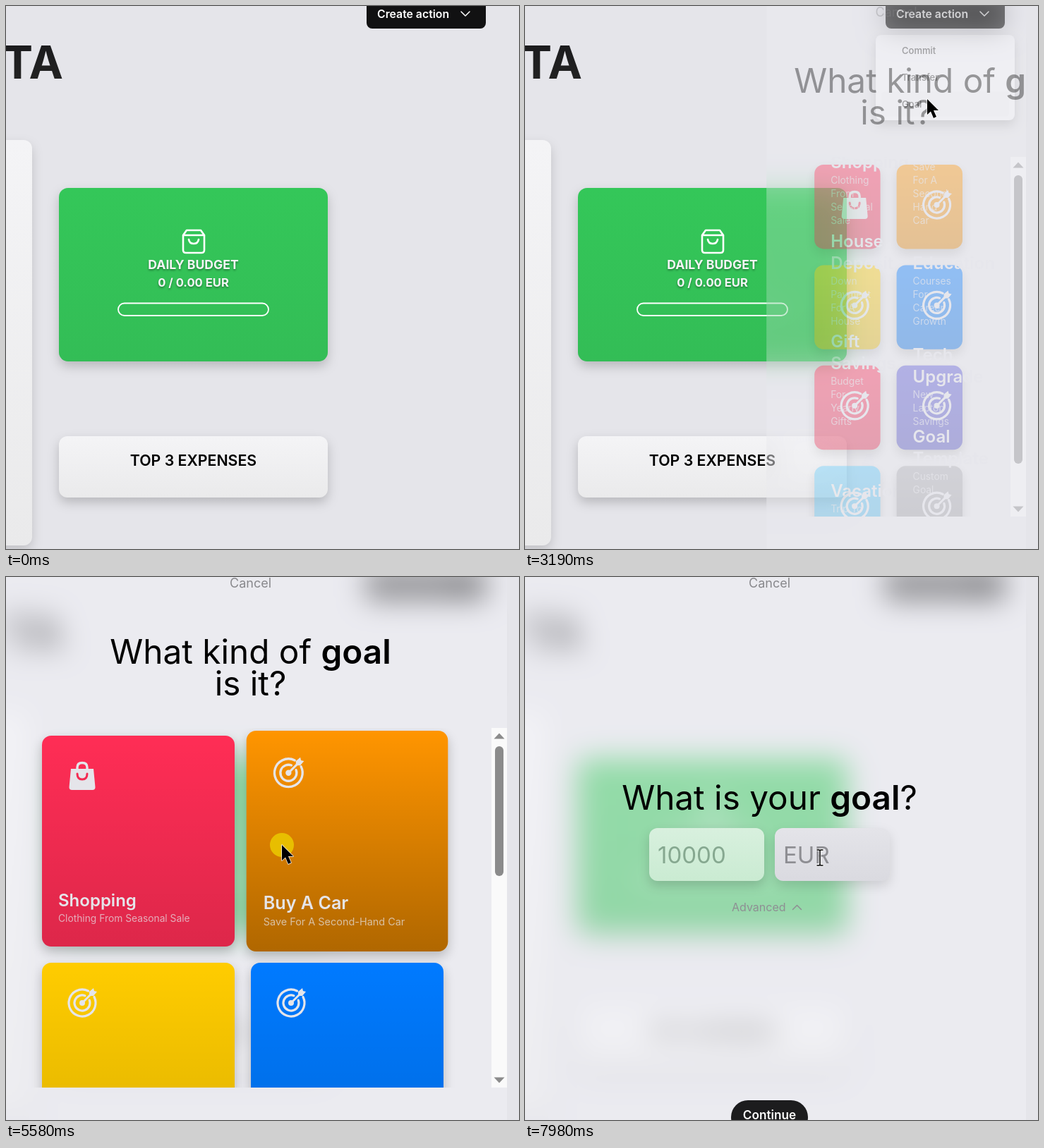
An HTML page with a canvas for the animation above (8 s loop, 727 px wide and 770 px high).

```html
<!DOCTYPE html>
<html lang="en">
<head>
<meta charset="utf-8">
<title>Budget goal</title>
<style>
html, body { margin: 0; width: 100%; height: 100%; overflow: hidden; background: #e5e5ea; }
canvas { display: block; }
</style>
</head>
<body>
<canvas id="stage" width="727" height="770"></canvas>
<script>
const W = 727, H = 770, PAD = 70, RIGHT = 710;
const LOOP = 8000, TICK = 133;
const BG = '#e5e5ea', GRAY = '#8e8e93';
const screen = document.getElementById('stage').getContext('2d');
let c = screen;

const CARDS = [
  ['#ff2d55', 'Shopping', 'Clothing From Seasonal Sale'],
  ['#ff9500', 'Buy A Car', 'Save For A Second-Hand Car'],
  ['#ffcc00', 'House Deposit', 'Down Payment For A House'],
  ['#007aff', 'Education', 'Courses For Career Growth'],
  ['#ff2d55', 'Gift Savings', 'Budget For Yearly Gifts'],
  ['#5856d6', 'Tech Upgrade', 'New Laptop Savings'],
  ['#5ac8fa', 'Vacation', 'Trip To Seaside'],
  ['#aeaeb2', 'Goal Template', 'Custom Goal', 46]
];

// pointer keys: tick, x, y, shape
const ARROW = 0, HAND = 1, BEAM = 2;
const PATH = [
  [2, 653, 285, ARROW], [3, 643, 210, ARROW], [4, 622, 105, ARROW], [5, 602, 35, ARROW],
  [7, 604, 20, HAND], [8, 604, 14, HAND], [14, 604, 14, HAND], [15, 602, 25, HAND],
  [16, 592, 62, HAND], [17, 578, 110, HAND], [18, 570, 132, HAND], [23, 570, 132, ARROW],
  [27, 570, 132, ARROW], [28, 450, 220, ARROW], [29, 345, 300, ARROW], [31, 315, 355, ARROW],
  [34, 315, 355, ARROW], [37, 365, 376, ARROW], [39, 390, 381, ARROW], [40, 391, 380, ARROW],
  [46, 391, 380, ARROW], [48, 381, 370, ARROW], [49, 333, 390, ARROW], [50, 300, 398, BEAM],
  [51, 273, 406, BEAM], [53, 312, 402, BEAM], [54, 335, 396, ARROW], [55, 344, 397, ARROW],
  [56, 388, 409, BEAM], [60, 418, 398, BEAM]
];
const POINTERS = [
  'M0 0V22L5 17.5 9 27 13 25 9 16H16Z',
  'M-2 16V2q2-4 4 0V10l7 2q3 1 3 4l-2 9v4H-1v-3L-8 17q-1-4 2-4z',
  'M-4-11h3l1 1 1-1h3M0-10V10M-4 11h3l1-1 1 1h3'
].map(d => new Path2D(d));

const ramp = (k, a, b) => Math.min(1, Math.max(0, (k - a) / (b - a)));
const easeInOut = p => p < .5 ? 4 * p ** 3 : 1 - 4 * (1 - p) ** 3;

function fade(y, h, top, bottom) {
  const g = c.createLinearGradient(0, y, 0, y + h);
  g.addColorStop(0, top);
  g.addColorStop(1, bottom);
  return g;
}

function box(x, y, w, h, r, fill, shadow = 0) {
  c.save();
  c.shadowColor = `rgba(0,0,0,${shadow})`;
  c.shadowBlur = 16;
  c.shadowOffsetY = 7;
  c.fillStyle = fill;
  c.beginPath();
  c.roundRect(x, y, w, h, r);
  c.fill();
  c.restore();
}

function line(path, color, width) {
  c.strokeStyle = color;
  c.lineWidth = width;
  c.stroke(new Path2D(path));
}

function font(size, weight) {
  c.font = `${weight} ${size}px Inter, sans-serif`;
}

function text(s, x, y, size, weight, color, align = 'left') {
  font(size, weight);
  c.fillStyle = color;
  c.textAlign = align;
  c.fillText(s, x, y);
}

function heading(light, bold, tail, mid, minX, y) {
  const parts = [[light, 400], [bold, 600], [tail, 400]];
  const widths = parts.map(([s, weight]) => (font(47.7, weight), c.measureText(s).width));
  let x = Math.max(minX, mid - (widths[0] + widths[1] + widths[2]) / 2);
  parts.forEach(([s, weight], i) => {
    text(s, x, y, 47.7, weight, '#000');
    x += widths[i];
  });
}

const chevron = (x, y, s, color) =>
  line(`M${x - 6} ${y - 3 * s}l6 ${6 * s} 6 ${-6 * s}`, color, 1.5);

function dashboard(hover, flip) {
  c.fillStyle = BG;
  c.fillRect(-PAD, -PAD, W + 2 * PAD, H + 2 * PAD);
  text('TA', 81, 103, 65, 700, fade(56, 47, '#1c1c1e', '#222'), 'right');
  box(-400, 190, 437, 575, 12, fade(190, 575, '#f4f4f6', '#eaeaeb'), .16);

  box(75, 258, 381, 246, 13, fade(258, 246, '#34c759', '#33bd56'), .2);
  c.lineJoin = c.lineCap = 'round';
  line('M256 318H276L281 325V346Q281 350 277 350H255Q251 350 251 346V325ZM251 325H281M259 331Q260 337 266 337T273 331', '#fff', 2.6);
  c.save();
  c.shadowColor = 'rgba(0,0,0,.35)';
  c.shadowBlur = 3;
  c.shadowOffsetY = 2;
  text('DAILY BUDGET', 265.5, 373, 17.6, 700, '#f5f5f7', 'center');
  text('0 / 0.00 EUR', 265.5, 398, 16.6, 700, '#f5f5f7', 'center');
  c.restore();
  c.strokeStyle = '#fff';
  c.lineWidth = 1.8;
  c.beginPath();
  c.roundRect(159, 421.5, 213, 17.5, 9);
  c.stroke();

  box(75, 610, 381, 87, 12, fade(610, 87, '#f4f4f6', '#eaeaeb'), .2);
  text('TOP 3 EXPENSES', 265.5, 652, 21.3, 600, '#000', 'center');

  box(511, -10, 169, 42, 8, hover ? '#1d1d1e' : '#111112');
  text('Create action', 526, 16.5, 15.8, 600, '#fff');
  chevron(651, 11, flip, '#fff');
}

function menu(k, pointer) {
  const open = ramp(k, 9, 12);
  if (!open) return;
  const w = 197 * (.8 + .2 * open);
  c.globalAlpha = open;
  box(595.5 - w / 2, 41, w, 121 * open ** 3, 8, '#f2f2f6', .2);
  ['Commit', 'Transfer', 'Goal'].forEach((label, i) => {
    const shown = ramp(k, 11.8 + i * .3, 13.8 + i * .1), y = 63 + 38 * i;
    if (k > 14 && Math.abs(pointer.y - y) < 19) box(505, y - 18, 181, 36, 6, '#eeeef2');
    c.globalAlpha = shown;
    text(label, 534, y + 4.5 - 15 * (1 - shown), 13, 500, '#555');
  });
  c.globalAlpha = 1;
}

function wrap(s, width) {
  const lines = [''];
  for (const word of s.match(/[^ -]+[ -]?/g)) {
    const last = lines.length - 1;
    if (lines[last] && c.measureText((lines[last] + word).trim()).width > width) lines.push(word);
    else lines[last] += word;
  }
  return lines;
}

function bagIcon(x, y) {
  c.fillStyle = BG;
  c.fill(new Path2D(`M${x - 16} ${y - 10}h32l2.5 26q0 4-4 4h-29q-4 0-4-4z`));
  line(`M${x - 7} ${y - 9}v-3q0-6.500 7-6.500t7 6.500v3`, BG, 3.4);
  line(`M${x - 7} ${y - 3}q0 8 7 8t7-8`, '#f42b52', 3);
}

function targetIcon(x, y) {
  c.strokeStyle = c.fillStyle = BG;
  c.lineWidth = 3.2;
  for (const [r, gap] of [[19, .32], [11, .42]]) {
    c.beginPath();
    c.arc(x, y, r, -Math.PI / 4 + gap, Math.PI * 1.75 - gap);
    c.stroke();
  }
  c.beginPath();
  c.arc(x, y, 4, 0, 7);
  c.fill();
  line(`M${x} ${y}l14-14`, BG, 3);
  c.fill(new Path2D(`M${x + 10} ${y - 10}v-6l6-5 1 4 4 1-5 6z`));
}

function card([color, title, note, lift = 0], i, x, y, w, h, grow) {
  c.save();
  c.translate(x + w / 2, y + h / 2);
  c.scale(1 + .046 * grow, 1 + .046 * grow);
  c.translate(-x - w / 2, -y - h / 2);
  box(x, y, w, h, 13, color, .22);
  box(x, y, w, h, 13, fade(y, h, 'rgba(0,0,0,0)', `rgba(0,0,0,${.135 + .175 * grow})`));
  (i ? targetIcon : bagIcon)(x + 57, y + 57);

  let base = y + h - 35 - lift;
  const stack = (s, size, weight, pitch, fill) => {
    font(size, weight);
    for (const row of wrap(s, w - 46).reverse()) {
      text(row, x + 23, base, size, weight, fill);
      base -= pitch;
    }
  };
  stack(note, 13.8, 400, 19, 'rgba(229,229,234,.7)');
  base -= 3;
  stack(title, 24, 600, 31, BG);
  c.restore();
}

function goalList(k, left) {
  const x0 = left + 68, w = (620 - x0 - 23) / 2, h = w + 26;
  const mid = (left + RIGHT) / 2;
  heading('What kind of ', 'goal', '', mid, left + 39, 123);
  heading('is it?', '', '', mid, left + 39, 168);
  if (w < 10) return;

  const grow = [ramp(k, 28, 31) * (1 - ramp(k, 35, 38)), ramp(k, 36, 39)];
  c.save();
  c.beginPath();
  c.rect(left, 214, RIGHT - left, 510);
  c.clip();
  CARDS.forEach((item, i) => card(item, i,
    x0 + i % 2 * (w + 23), 225 + (i >> 1) * (h + 23), w, h, grow[i] || 0));
  c.fillStyle = '#fafafa';
  c.fillRect(688, 214, 22, 510);
  box(693, 240, 12, 240000 / (4 * h + 109), 6, '#8b8b8b');
  c.fillStyle = '#8b8b8b';
  c.fill(new Path2D('M691.500 229.500h15l-7.500-8zM691.500 709.500h15l-7.500 8z'));
  c.restore();
}

function goalForm(k) {
  box(292, 742, 109, 48, 24, '#1c1c1e');
  text('Continue', 346.5, 769, 17.2, 600, '#fff', 'center');
  c.globalAlpha = ramp(k, 44, 48);
  heading('What is your ', 'goal', '?', 346.5, 0, 330);
  box(176, 356, 163, 75, 12, fade(356, 75, '#d8f0de', '#caebd2'), .16);
  box(354, 356, 163, 75, 12, fade(356, 75, '#e4e4e9', '#dadae0'), .12);
  text('10000', 188, 406, 33, 400, '#86a890');
  text('EUR', 366, 406, 33, 400, GRAY);
  text('Advanced', 293, 474, 16, 400, GRAY);
  chevron(385.5, 468.5, -1, GRAY);
  c.globalAlpha = 1;
}

function panel(k) {
  const p = easeInOut(ramp(k, 21.48, 26.5));
  if (!p) return;
  const left = RIGHT - 727 * p;

  // the content fades as one group, so it gets its own layer
  c = content;
  c.clearRect(0, 0, W, H);
  text('Cancel', (left + RIGHT) / 2, 15, 18, 400, '#88888c', 'center');
  if (k < 44) goalList(k, left);
  else goalForm(k);
  c = screen;

  c.save();
  c.beginPath();
  c.rect(left, 0, RIGHT - left, H);
  c.clip();
  c.globalAlpha = p;
  c.drawImage(frosted, -PAD, -PAD);
  c.globalAlpha = p ** 1.45;
  c.drawImage(content.canvas, 0, 0);
  c.restore();
}

function pointerAt(k) {
  const i = PATH.findLastIndex(key => key[0] <= k);
  if (i < 0) return { x: 0, y: -99, shape: ARROW };
  const [a, x, y, shape] = PATH[i], [b, nx, ny] = PATH[i + 1] || PATH[i];
  const p = b > a ? (k - a) / (b - a) : 0;
  return { x: x + (nx - x) * p, y: y + (ny - y) * p, shape };
}

function drawPointer(k, { x, y, shape }) {
  c.save();
  c.translate(x, y);
  if ([10, 11, 21, 22, 42, 43].includes(k)) {
    c.fillStyle = 'rgba(235,200,0,.88)';
    c.beginPath();
    c.arc(0, 0, 17, 0, 7);
    c.fill();
  }
  const d = POINTERS[shape];
  c.lineWidth = shape === BEAM ? 3 : 1.4;
  c.strokeStyle = shape === HAND ? '#000' : '#fff';
  c.stroke(d);
  if (shape === BEAM) {
    c.lineWidth = 1.5;
    c.strokeStyle = '#000';
    c.stroke(d);
  } else {
    c.fillStyle = shape === HAND ? '#fff' : '#000';
    c.fill(d);
  }
  if (shape === HAND) line('M2 10v5M6 12v4M9 13v3', '#000', 1);
  c.restore();
}

function newLayer(w, h) {
  const canvas = document.createElement('canvas');
  canvas.width = w;
  canvas.height = h;
  const layer = canvas.getContext('2d');
  layer.lineJoin = layer.lineCap = 'round';
  return layer;
}

// blurred and tinted copy of the dashboard behind the panel
function frostedDashboard() {
  const w = W + 2 * PAD, h = H + 2 * PAD;
  const sharp = newLayer(w, h), blurred = newLayer(w, h);
  c = sharp;
  c.translate(PAD, PAD);
  dashboard(false, 1);
  c = blurred;
  c.filter = 'blur(20px)';
  c.drawImage(sharp.canvas, 0, 0);
  c.filter = 'none';
  c.fillStyle = 'rgba(242,242,247,.5)';
  c.fillRect(0, 0, w, h);
  c = screen;
  return blurred.canvas;
}

const content = newLayer(W, H);
const frosted = frostedDashboard();

function draw() {
  const k = Math.floor((performance.now() % LOOP + 22) / TICK);
  const pointer = pointerAt(k);
  dashboard(k >= 7 && k < 16, 1 - 2 * ramp(k, 10, 12.5) + 2 * ramp(k, 15, 18));
  menu(k, pointer);
  panel(k);
  drawPointer(k, pointer);
  requestAnimationFrame(draw);
}
draw();
</script>
</body>
</html>
```
